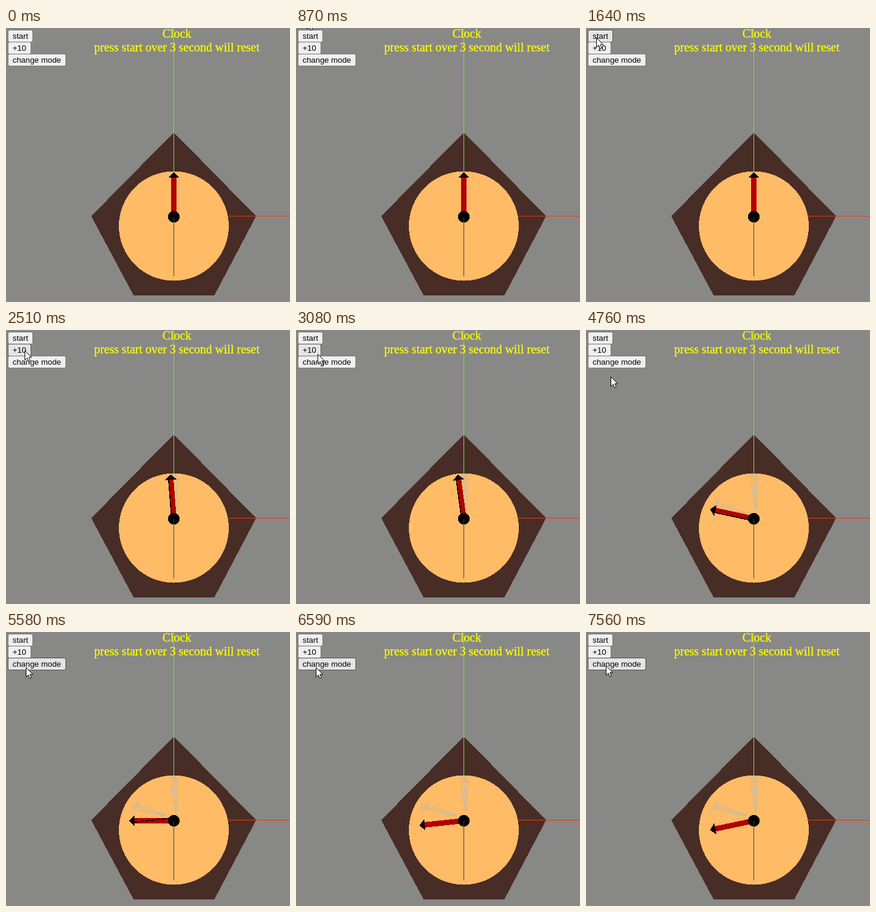
Animation of 473 by 458 pixels, one loop 8000 ms. Source, as an HTML page:

```html
<!DOCTYPE html>
<html lang="en">
<head>
<meta charset="utf-8">
<title>Clock</title>
<style>
html, body { margin: 0; width: 100%; height: 100%; overflow: hidden; background: #888886; }
svg { display: block; width: 473px; height: 458px; }
.scene { shape-rendering: crispEdges; }
.title { font: 20px "Liberation Serif", "Times New Roman", serif; fill: #ff0; stroke: #ff0; stroke-width: .3; text-anchor: middle; }
.button rect { fill: #efefef; stroke: #767676; }
.button text { font: 13.333px "Liberation Sans", Arial, sans-serif; }
.button.hover rect { fill: #e5e5e5; stroke: #4f4f4f; }
#trail { fill: none; stroke: #b9b7b2; }
</style>
</head>
<body>
<svg viewBox="0 0 473 458">
  <g class="scene">
    <path d="M279.5 174.5 416.5 314.5 347 447H212.5L142 314.5Z" fill="#482c26"/>
    <path d="M279.5 0V241" stroke="#7ee04e"/>
    <path d="M370 314.5H473" stroke="#e63c0a"/>
    <circle cx="279.5" cy="331" r="91.5" fill="#ffbb66"/>
    <g id="trail"></g>
    <g id="hand">
      <path d="M275 249.5H284V315.5H275Z" fill="#b00000"/>
      <path id="edge" d="M275 249H276.5V308H275Z"/>
      <path id="flecks" d="M277 250 284 310" stroke="#000" stroke-width="2" stroke-dasharray="7 2"/>
      <path d="M279.5 241 289 250H270Z"/>
    </g>
    <circle cx="279.5" cy="315.5" r="9.7"/>
    <path d="M279.5 316V415" stroke="#3f4550"/>
  </g>

  <text class="title" x="284.5" y="16">Clock</text>
  <text class="title" x="284.5" y="39">press start over 3 second will reset</text>

  <g class="button"><rect x="3.5" y="3.5" width="41" height="20" rx="2.5"/><text x="11" y="18">start</text></g>
  <g class="button"><rect x="3.5" y="23.5" width="38" height="20" rx="2.5"/><text x="11" y="38">+10</text></g>
  <g class="button"><rect x="3.5" y="43.5" width="96" height="20" rx="2.5"/><text x="11" y="58">change mode</text></g>

  <path id="cursor" d="M.5 .5V16.3L4.2 12.8 6.8 18.6 9.4 17.4 6.8 11.8H11.8Z" fill="#fff" stroke="#000"/>
</svg>
<script>
const LOOP = 8000;
const START = 1800, PLUS = 3500, MODE = 5570;   // when each button takes effect
const JUMP = 60, SPEED = 0.006, TICK = 985;     // degrees, degrees per ms, ms

// pointer trips, each a list of [time, x, y]
const trips = [
  { end: 570, path: [[270, 460, 446], [370, 466, 401]] },
  { end: LOOP, path: [
    [720, 440, 336], [870, 18, -15], [1250, 10, -8], [1490, 16, 21],
    [1640, 17, 16], [1840, 17, 16], [2700, 35, 39], [3080, 36, 40],
    [3500, 25, 33], [4000, 25, 33], [4800, 42, 80], [5550, 33, 59],
    [6690, 33, 59], [6740, 33, 56]
  ] }
];

const $ = id => document.getElementById(id);
const show = (el, on) => el.setAttribute("visibility", on ? "visible" : "hidden");
const turn = (el, deg) => el.setAttribute("transform", `rotate(${-deg} 279.5 315.5)`);
const buttons = [...document.querySelectorAll(".button")].map(el => ({
  el, box: el.querySelector("rect").getBBox()
}));

// the hand leaves its trailing outline behind on each sweep
const marks = [0, PLUS].flatMap(from => [0, 1, 2].map(i => {
  const el = document.createElementNS("http://www.w3.org/2000/svg", "path");
  el.setAttribute("d", "M284 300V250H289L279.5 241");
  const deg = angleAt(from) + i * 4;
  turn(el, deg);
  $("trail").append(el);
  return { el, deg };
}));

// smooth sweep at first, whole seconds after the mode change
function angleAt(t) {
  if (t >= MODE) return 90 + 6 * Math.floor((t - MODE) / TICK);
  return Math.max(0, t - START) * SPEED + (t >= PLUS ? JUMP : 0);
}

function pointerAt(t) {
  const trip = trips.find(({ path, end }) => t >= path[0][0] && t < end);
  if (!trip) return null;
  const i = trip.path.findLastIndex(p => p[0] <= t);
  const a = trip.path[i], b = trip.path[i + 1] || a;
  const k = b === a ? 0 : (t - a[0]) / (b[0] - a[0]);
  return [1, 2].map(n => Math.round(a[n] + (b[n] - a[n]) * k));
}

function draw(t) {
  const angle = angleAt(t);
  turn($("hand"), angle);
  show($("edge"), angle > 0 && t < MODE);
  show($("flecks"), angle === 90);
  marks.forEach(m => show(m.el, angle > m.deg + 3));

  const pos = pointerAt(t);
  show($("cursor"), pos);
  if (pos) $("cursor").setAttribute("transform", `translate(${pos})`);
  for (const { el, box } of buttons) {
    const over = pos && pos[0] >= box.x && pos[0] < box.x + box.width &&
      pos[1] >= box.y && pos[1] < box.y + box.height;
    el.classList.toggle("hover", !!over);
  }
}

const begin = performance.now();
function frame() {
  const t = (performance.now() - begin) % LOOP;
  draw(Math.floor(t / 10) * 10);
  requestAnimationFrame(frame);
}
frame();
</script>
</body>
</html>
```
